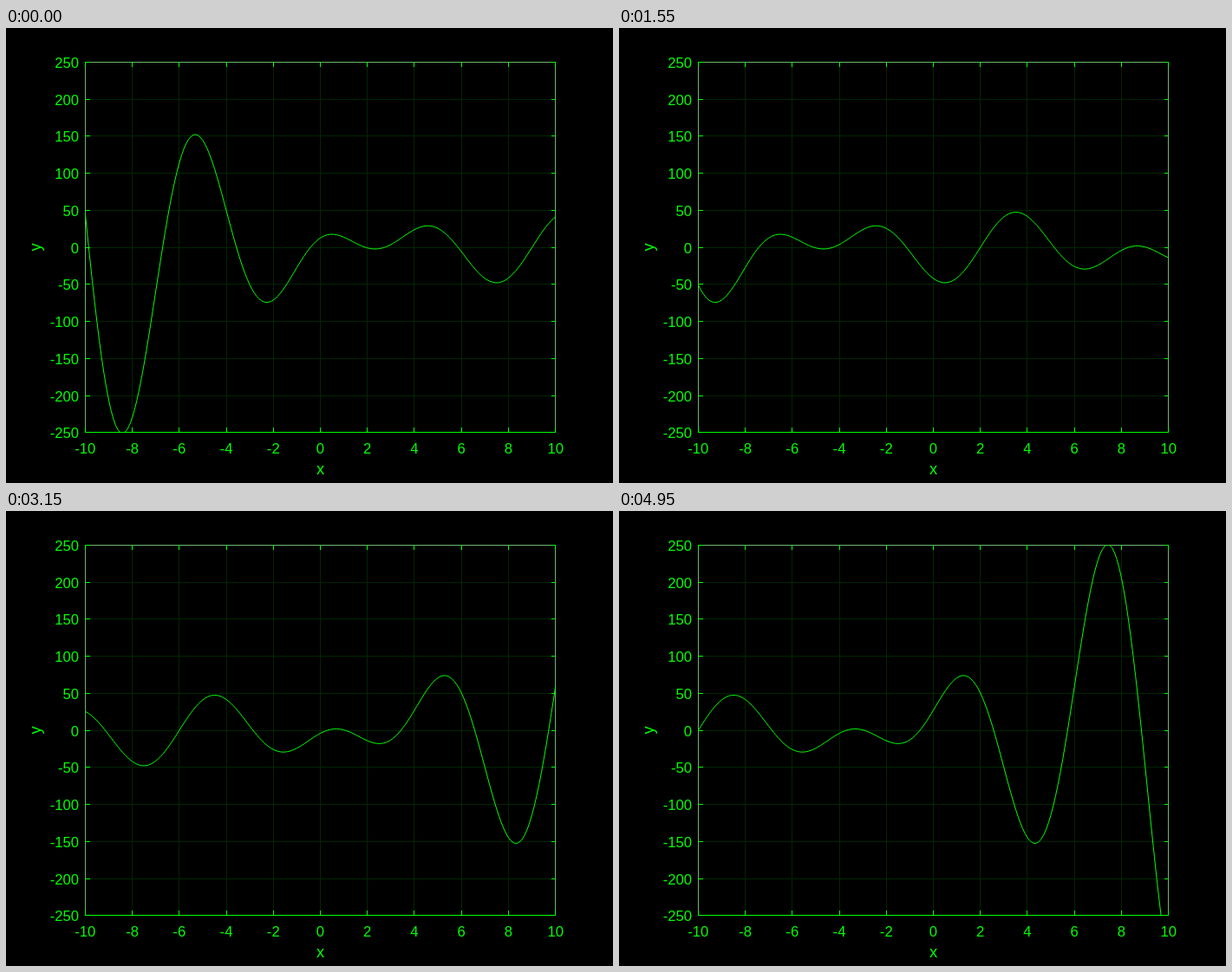
These frames come from a looping animation (700 px wide and 525 px high, 5 s). An HTML page:

```html
<!DOCTYPE html>
<html lang="en">
<head>
<meta charset="utf-8">
<title>Moving wave plot</title>
<style>
  html, body { margin: 0; width: 100%; height: 100%; overflow: hidden; background: #000; }
  svg { display: block; width: 700px; height: 525px; }
  path { fill: none; stroke: #0f0; stroke-width: 1; }
  .crisp { shape-rendering: crispEdges; }
  #grid { stroke: #002600; }
  #box { stroke: #70b470; }
  text { fill: #0f0; font: 16.67px "Liberation Sans", Arial, sans-serif; text-anchor: middle; }
  .right { text-anchor: end; }
  .title { font-size: 18.33px; }
</style>
</head>
<body>
<svg viewBox="0 0 700 525">
  <defs><clipPath id="area"><rect x="91" y="39" width="543" height="428"/></clipPath></defs>
  <path id="grid" class="crisp"/>
  <path id="box" class="crisp" d="M91.5 466.5V39.5H633.5V466.5"/>
  <path id="ticks" class="crisp"/>
  <path id="curve" clip-path="url(#area)"/>
  <g id="labels"></g>
  <text class="title" x="362.5" y="514.5">x</text>
  <text class="title" transform="translate(40 253) rotate(-90)">y</text>
</svg>
<script>
  const STEP = 50, LOOP = 5000;
  const LEFT = 91.5, RIGHT = 633.5, TOP = 39.5, BOTTOM = 466.5;
  const el = id => document.getElementById(id);
  const px = x => 362.5 + x * 27.12;
  const py = y => 253.2 - y * 0.855;
  const snap = v => Math.floor(v) + 0.5;

  function drawAxes() {
    let grid = '', ticks = `M${LEFT - 0.5} ${BOTTOM}H${RIGHT + 0.5}`, labels = '';
    for (let x = -10; x <= 10; x += 2) {
      const p = snap(px(x));
      if (Math.abs(x) < 10) grid += `M${p} ${TOP}V${BOTTOM}`;
      ticks += `M${p} ${BOTTOM}v-5.5M${p} ${TOP - 0.5}v5.5`;
      labels += `<text x="${px(x)}" y="491">${x}</text>`;
    }
    for (let y = -250; y <= 250; y += 50) {
      const p = snap(py(y));
      if (Math.abs(y) < 250) grid += `M${LEFT} ${p}H${RIGHT}`;
      ticks += `M${LEFT - 0.5} ${p}h5.5M${RIGHT + 0.5} ${p}h-5.5`;
      labels += `<text class="right" x="84" y="${p + 6.5}">${y}</text>`;
    }
    el('grid').setAttribute('d', grid);
    el('ticks').setAttribute('d', ticks);
    el('labels').innerHTML = labels;
  }

  // The wave's centre bounces between -10 and 10, one unit per step.
  const centre = n => Math.abs((n + 1) % 40 - 20) - 10;
  const wave = v => (50 - v * v) * Math.sin(v);

  function drawCurve(c) {
    const points = [];
    for (let i = -100; i <= 100; i++) {
      const x = i / 10;
      points.push(px(x).toFixed(2) + ' ' + py(wave(x - c)).toFixed(2));
    }
    el('curve').setAttribute('d', 'M' + points.join('L'));
  }

  const start = performance.now();
  let last = -1;
  function tick(now) {
    const n = Math.floor(Math.max(0, now - start) % LOOP / STEP);
    if (n !== last) drawCurve(centre(last = n));
    requestAnimationFrame(tick);
  }

  drawAxes();
  tick(start);
</script>
</body>
</html>
```
